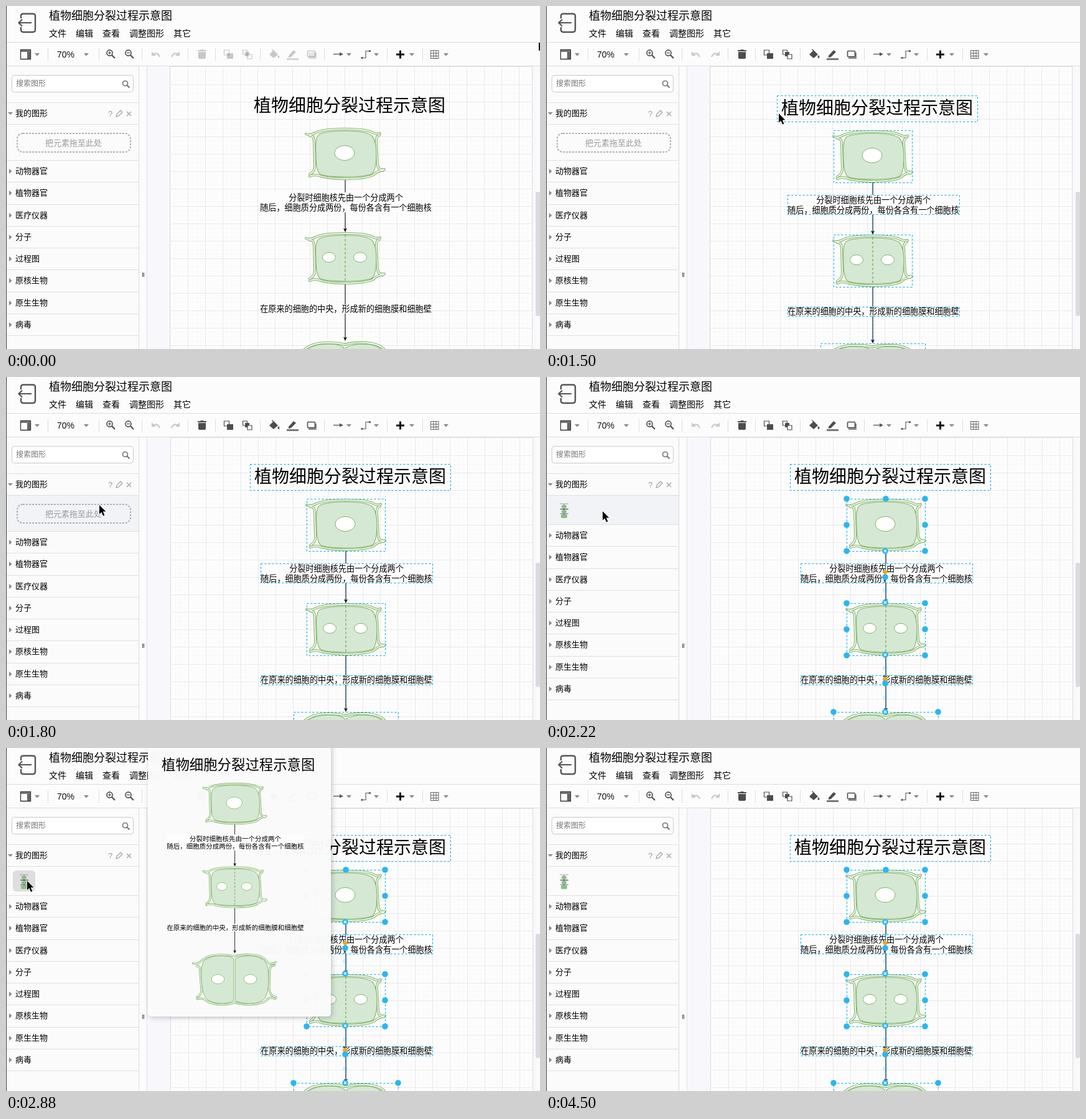
An HTML page with a canvas that plays this animation: 858 by 552 pixels, repeating every 4.62 s.

```html
<!DOCTYPE html>
<html lang="zh-CN">
<head>
<meta charset="utf-8">
<style>
html, body { margin: 0; width: 858px; height: 552px; overflow: hidden; background: #fff; }
canvas { display: block; }
</style>
</head>
<body>
<canvas id="stage" width="858" height="552"></canvas>
<script>
const ctx = document.getElementById('stage').getContext('2d');
const LOOP = 4620, TICK = 60;
const CJK = '"Noto Sans CJK SC", "Noto Sans CJK", "Noto Sans SC", sans-serif';
const TITLE = '植物细胞分裂过程示意图';
const GREEN = '#82b366', LEAF = '#d5e8d4', BLUE = '#29b6f2', INK = '#4d4d4d';

// time, x, y of the pointer
const TRACK = [
  [0, 856, 58], [360, 733, 170], [720, 733, 170], [780, 675, 216],
  [960, 560, 200], [1260, 420, 163], [1440, 400, 167], [1620, 322, 184],
  [1680, 268, 190], [1800, 150, 206], [2040, 91, 216], [2220, 91, 216],
  [2640, 34, 214], [3540, 34, 214], [3600, 62, 211], [3840, 430, 150],
  [4080, 833, 78], [4140, 850, 66], [4200, 866, 56]
];

function pointer(t) {
  const i = TRACK.findIndex(k => k[0] > t);
  if (i < 0) return TRACK[TRACK.length - 1].slice(1);
  const [t0, x0, y0] = TRACK[i - 1], [t1, x1, y1] = TRACK[i];
  const u = (t - t0) / (t1 - t0);
  return [Math.round(x0 + (x1 - x0) * u), Math.round(y0 + (y1 - y0) * u)];
}

function rect(x, y, w, h, color) {
  ctx.fillStyle = color;
  ctx.fillRect(x, y, w, h);
}

function round(x, y, w, h, r, fill, stroke, width = 1) {
  ctx.beginPath();
  ctx.roundRect(x, y, w, h, r);
  if (fill) { ctx.fillStyle = fill; ctx.fill(); }
  if (stroke) { ctx.strokeStyle = stroke; ctx.lineWidth = width; ctx.stroke(); }
}

function text(s, x, y, size, color = '#000', align = 'left', font = CJK) {
  ctx.font = size + 'px ' + font;
  ctx.textAlign = align;
  ctx.fillStyle = color;
  ctx.fillText(s, x, y);
}

function line(d, color = INK, width = 1.5) {
  ctx.strokeStyle = color;
  ctx.lineWidth = width;
  ctx.stroke(new Path2D(d));
}

function shape(d, color) {
  ctx.fillStyle = color;
  ctx.fill(new Path2D(d));
}

function oval(x, y, rx, ry, fill, stroke) {
  ctx.beginPath();
  ctx.ellipse(x, y, rx, ry, 0, 0, 7);
  ctx.fillStyle = fill;
  ctx.fill();
  if (stroke) { ctx.strokeStyle = stroke; ctx.lineWidth = 1; ctx.stroke(); }
}

function at(x, y, draw) {
  ctx.save();
  ctx.translate(x, y);
  draw();
  ctx.restore();
}

// ---- cells ----
const WALLS = [
  'M0 10Q8 13 15 8Q28 2 63 2Q98 2 108 8Q113 11 119 9',
  'M6 13Q13 12 13 22L14 60Q15 70 6 75',
  'M118 12Q112 13 113 24L115 60Q116 69 126 67',
  'M6 78Q14 74 24 78Q40 82 63 82Q95 82 108 76Q116 68 124 69'
].join('');
const BODY = 'M16 42Q14 14 22 10Q35 5 63 5Q95 5 105 12Q113 20 113 42' +
  'Q113 68 106 74Q95 79 63 79Q30 79 22 74Q16 68 16 42Z';
const TWIN_WALLS = [
  'M0 20Q8 24 16 16Q28 3 55 3Q75 3 84 6Q95 2 118 3Q142 5 148 16Q155 25 166 18',
  'M8 26Q14 24 14 34L17 72Q18 84 8 88',
  'M164 24Q154 24 154 36L153 70Q154 87 167 88',
  'M9 92Q18 88 26 95Q38 103 58 103Q76 103 84 99Q98 103 115 103Q140 102 148 94Q156 86 165 92'
].join('');
const TWIN_BODY =
  'M17 50Q15 22 24 13Q36 5 56 5Q76 5 82 11L82 95Q74 101 58 101Q36 101 26 90Q18 80 17 50Z' +
  'M85 11Q94 5 116 5Q137 6 146 18Q152 28 152 52Q152 80 144 91Q134 101 115 101Q93 101 85 95Z';

function tissue(walls, body) {
  ctx.lineCap = 'round';
  line(walls, GREEN, 4);
  line(walls, '#f3f9f1', 1.8);
  ctx.lineCap = 'butt';
  shape(body, LEAF);
  line(body, GREEN, 1.1);
}

function arrow(y0, y1) {
  rect(544.5, y0, 1.1, y1 - y0 - 4, '#111');
  shape(`M545 ${y1}l-3-6.5l3 1.5l3-1.5z`, '#111');
}

function diagram() {
  text(TITLE, 398, 170, 28);
  arrow(280, 364);
  arrow(448, 539);
  at(482, 196, () => {
    tissue(WALLS, BODY);
    oval(62, 40.5, 16, 12, '#fff', GREEN);
  });
  at(482, 364, () => {
    tissue(WALLS, BODY);
    ctx.setLineDash([4, 3]);
    line('M63 4V81', GREEN, 1.4);
    ctx.setLineDash([]);
    oval(37, 40.5, 10.5, 8, '#fff', GREEN);
    oval(87, 40.5, 10.5, 8, '#fff', GREEN);
  });
  at(461, 539, () => {
    tissue(TWIN_WALLS, TWIN_BODY);
    oval(50, 52, 13, 9.5, '#fff', GREEN);
    oval(115, 52, 13, 9.5, '#fff', GREEN);
  });
  rect(408, 300, 276, 32, '#fdfdfd');
  rect(408, 480, 276, 15, '#fdfdfd');
  text('分裂时细胞核先由一个分成两个', 546, 313, 13.14, '#000', 'center');
  text('随后，细胞质分成两份，每份各含有一个细胞核', 546, 329, 13.14, '#000', 'center');
  text('在原来的细胞的中央，形成新的细胞膜和细胞壁', 546, 492, 13.14, '#000', 'center');
}

// ---- selection ----
const BOXES = [
  [391, 140, 322, 42], [482, 196, 126, 84], [408, 300, 276, 31],
  [482, 364, 126, 84], [408, 480, 276, 15], [461, 539, 168, 105]
];

function outlines() {
  ctx.setLineDash([3, 3]);
  ctx.strokeStyle = '#00a8e8';
  ctx.lineWidth = 1;
  for (const [x, y, w, h] of BOXES) ctx.strokeRect(x + .5, y + .5, w, h);
  line('M545.5 280V300M545.5 332V360M545.5 448V480M545.5 496V535', '#0a78c0', 1);
  ctx.setLineDash([]);
}

function knob(x, y) { oval(x, y, 4.8, 4.8, BLUE); }

function handles() {
  line('M544.5 300V332M544.5 480V496', '#27597c', 1);
  for (const i of [1, 3, 5]) {
    const [x, y, w, h] = BOXES[i];
    for (const fy of [0, .5, 1]) {
      knob(x, y + h * fy);
      knob(x + w, y + h * fy);
    }
  }
  knob(545, 196);
  for (const y of [301, 343, 469, 516]) oval(544, y, 4, 4, 'rgba(41,182,242,.2)');
  for (const y of [314, 486]) shape(`M544 ${y - 4.5}l4.5 4.5l-4.5 4.5l-4.5-4.5z`, '#f5a418');
  for (const y of [322, 493]) knob(544, y);
  for (const y of [280, 363, 447, 539]) {
    knob(544, y);
    line(`M542 ${y - 2}l4 4m0-4l-4 4`, '#fff', 1.1);
  }
}

// ---- page ----
function page(shift) {
  rect(227, 97, 631, 455, '#f8f8fc');
  const x0 = 263 + shift;
  rect(x0, 97, 582, 455, '#fdfdfd');
  for (let i = 1; i < 84; i++) {
    const c = i % 4 ? '#f9f9f9' : '#e9e9e9';
    if (i % 4) {
      if (i < 83) rect(x0 + 1 + i * 7, 97, 1, 455, c);
      if (i < 65) rect(x0, 98 + i * 7, 582, 1, c);
    }
  }
  for (let x = x0 + 29; x < 845; x += 28) rect(x, 97, 1, 455, '#e9e9e9');
  for (let y = 126; y < 552; y += 28) rect(x0, y, 582, 1, '#e9e9e9');
  rect(x0, 97, 1, 455, shift ? '#d9dcdf' : '#cfe0ca');
  rect(x0 + 582, 97, 1, 455, '#d9dcdf');
  rect(x0, 97, 582, 1, '#dde3dc');
}

// ---- toolbar ----
function drop(x) { shape(`M${x - 4} 76h8l-4 4.5z`, '#8a8a8a'); }

function lens(x, y, mark) {
  ctx.beginPath();
  ctx.arc(x - 1.5, y - 1.5, 4.6, 0, 7);
  ctx.strokeStyle = INK;
  ctx.lineWidth = 1.6;
  ctx.stroke();
  line(`M${x + 2} ${y + 2}l5 5`, INK, 2.2);
  if (mark) line(`M${x - 4} ${y - 1.5}h5` + (mark === '+' ? `m-2.5-2.5v5` : ''), INK, 1.2);
}

function editIcons() {
  shape('M308 71h4l1-1h4l1 1h4v2h-14zM309 74h12v9q0 2-2 2h-8q-2 0-2-2z', INK);
  round(350.5, 71, 8, 8, 0, null, INK, 1.2);
  rect(355, 76, 10, 9, INK);
  round(380.5, 71, 7, 7, 0, null, INK, 1.2);
  rect(384, 74, 7, 7, INK);
  round(388, 78, 7, 7, 0, '#fbfbfb', INK, 1.2);
  shape('M423 78l6-6l-2-2l1-1l9 9l-7 6zM438 79q3 4 0 5q-3-1 0-5z', INK);
  shape('M454 80l8-9l4 3l-8 8l-4 1z', INK);
  rect(451, 84, 19, 3, '#777');
  rect(486, 75, 13, 10, '#8c8c8c');
  round(484.5, 72.5, 12, 9, 1, '#fbfbfb', INK, 1.6);
}

function toolbar(strength) {
  rect(0, 0, 858, 97, '#fcfcfc');
  rect(0, 58, 858, 1, '#dcdcdc');
  rect(0, 96, 858, 1, '#dcdcdc');
  line('M24 20V16Q24 12.5 28 12.5H43Q47 12.5 47 16V38Q47 42 43 42H28Q24 42 24 38V34', '#555', 2.4);
  line('M41 27H21M26 21.5L20.5 27L26 32.5', '#555', 2.2);
  text(TITLE, 69, 22, 18);
  [['文件', 69], ['编辑', 112], ['查看', 155], ['调整图形', 198], ['其它', 269]]
    .forEach(([s, x]) => text(s, x, 49, 14));

  for (const x of [67, 149, 218, 292, 336, 408, 511, 612, 669]) rect(x, 68, 1, 20, '#dedede');
  for (const x of [50, 129, 551, 595, 652, 707]) drop(x);
  round(23.5, 70.5, 16, 15, 0, '#fff', '#333', 1.3);
  rect(24, 71, 15, 3, '#777');
  rect(34, 74, 5, 11, '#666');
  text('70%', 82, 83, 14, '#111', 'left', '"Liberation Sans", Arial, sans-serif');
  lens(168, 77, '+');
  lens(198, 77, '-');
  line('M236 78q7-5 11 4', '#c8c8c8', 2);
  shape('M234 73v7h7z', '#c8c8c8');
  line('M277 78q-7-5-11 4', '#c8c8c8', 2);
  shape('M279 73v7h-7z', '#c8c8c8');
  ctx.globalAlpha = strength;
  editIcons();
  ctx.globalAlpha = 1;
  line('M526 77.5h12', '#555', 1.3);
  shape('M536 74.5l6 3l-6 3z', '#555');
  line('M573 83.5h5v-11h6', '#666', 1.2);
  round(570.5, 82, 3, 3, 0, '#666');
  round(583, 71, 3, 3, 0, '#666');
  line('M627 78h13M633.5 71.5v13', '#111', 3);
  line('M682 71.5h13M682 76h13M682 80.5h13M682 84.5h13M682.5 71v14M687 71v14M691 71v14M695 71v14', '#666', 1);
}

// ---- sidebar ----
const GROUPS = ['动物器官', '植物器官', '医疗仪器', '分子', '过程图', '原核生物', '原生生物', '病毒'];

function thumb(hover) {
  if (hover) round(11, 197, 36, 34, 6, '#dedede');
  rect(22, 203.5, 14, 1, '#9aa3a8');
  rect(28.5, 205, 1, 20, '#333');
  for (const [x, y, w, h] of [[25, 206, 8, 5], [25, 214, 8, 5], [24, 221, 10, 6]]) {
    round(x, y, w, h, 2, '#8fbd7f');
  }
  rect(23, 212, 13, 1.2, '#35506c');
  rect(23, 219.5, 13, 1, '#57708a');
}

function sidebar(stored, lit, hover) {
  rect(0, 97, 227, 455, '#fbfbfb');
  rect(213, 97, 1, 455, '#dcdcdc');
  rect(226, 97, 1, 455, '#e2e2e2');
  rect(219, 429, 1, 7, '#444');
  rect(221, 429, 1, 7, '#444');
  round(9.5, 111.5, 195, 27, 4, '#fff', '#c9c9c9');
  text('搜索图形', 16, 129, 12, '#777');
  ctx.beginPath();
  ctx.arc(191.5, 124.5, 4, 0, 7);
  ctx.strokeStyle = '#777';
  ctx.lineWidth = 1.7;
  ctx.stroke();
  line('M194.5 127.5l4 4', '#777', 2.2);
  rect(0, 155, 213, 1, '#e0e0e0');
  shape('M3 171h8l-4 4z', '#888');
  text('我的图形', 15, 177, 13);
  text('?', 164, 178, 13, '#999', 'left', '"Liberation Sans", Arial, sans-serif');
  line('M177 178l1-4l6-6l3 3l-6 6z', '#999', 1.1);
  line('M194 170l7 7m0-7l-7 7', '#a5aab0', 1.5);
  const top = stored ? 237 : 248;
  if (lit) rect(0, 191, 213, top - 191, '#f1f3f6');
  rect(0, 190, 213, 1, '#e0e0e0');
  if (stored) thumb(hover);
  else {
    ctx.setLineDash([3, 2]);
    round(18, 205, 182, 30, 9, null, '#b0b0b0', 2);
    ctx.setLineDash([]);
    text('把元素拖至此处', 63, 225, 13, '#999');
  }
  GROUPS.forEach((name, i) => {
    const y = Math.round(top + i * 35.25);
    rect(0, y, 213, 1, '#e0e0e0');
    shape(`M5 ${y + 14}l4.5 4l-4.5 4z`, '#888');
    text(name, 15, y + 22, 13);
  });
  rect(0, top + 282, 213, 1, '#e0e0e0');
}

function preview() {
  ctx.save();
  ctx.shadowColor = 'rgba(0,0,0,.22)';
  ctx.shadowBlur = 8;
  ctx.shadowOffsetX = 2;
  ctx.shadowOffsetY = 2;
  round(228, -8, 294, 440, 5, 'rgba(252,252,252,.97)');
  ctx.restore();
  ctx.save();
  ctx.translate(-68.4, -100.8);
  ctx.scale(.8, .8);
  diagram();
  ctx.restore();
}

function draw(t) {
  const [px, py] = pointer(t);
  const selected = t >= 780;
  const dragging = t >= 1320 && t < 1740;
  const stored = t >= 2220;
  const shift = t >= 1740 ? 1 : 0;
  let dx = shift, dy = 0;
  if (dragging) {
    const [gx, gy] = pointer(t - TICK);
    dx = gx - 420;
    dy = gy - 163;
  }

  page(shift);
  at(dx, dy, () => {
    diagram();
    if (selected) outlines();
    if (selected && (t < 1320 || stored)) handles();
  });
  rect(851, 97, 7, 455, '#fafafa');
  round(851, 299, 7, 200, 3, '#dadbe0');
  sidebar(stored, t >= 1800 && t < 2340, px < 47 || t === 3600);
  toolbar(selected ? Math.min(1, .6 + (t - 780) / 600) : .3);
  rect(0, 0, 1, 552, '#3a3a3a');
  if (t >= 2880 && t < 3600) preview();

  at(px, py, () => {
    const d = 'M0 0V14.5L3.4 11.4L6 17.5L8.4 16.4L5.8 10.6H10.4Z';
    line(d, '#fff', 1.2);
    shape(d, '#000');
  });
}

let last = -1;
const start = performance.now();
function loop(now) {
  const t = Math.floor((Math.max(0, now - start) % LOOP) / TICK) * TICK;
  if (t !== last) draw(last = t);
  requestAnimationFrame(loop);
}
draw(0);
requestAnimationFrame(loop);
</script>
</body>
</html>
```
